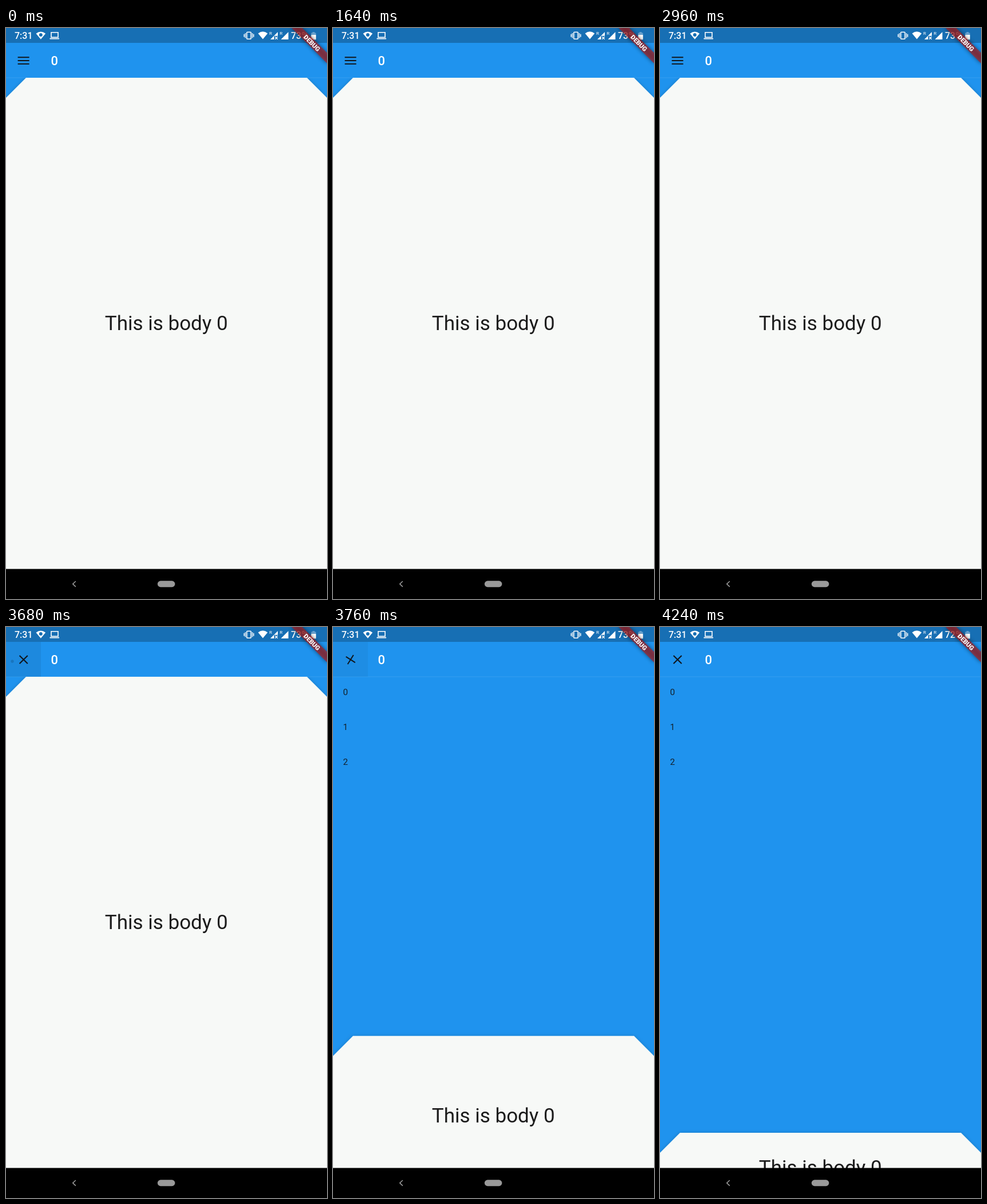
Animation of 561x998 px, one loop 5040 ms. Source, as an HTML page:

```html
<!DOCTYPE html>
<html lang="en">
<head>
<meta charset="utf-8">
<title>Backdrop</title>
<style>
  html, body { margin: 0; width: 100%; height: 100%; overflow: hidden; background: #000; }
  svg { display: block; width: 100vw; height: 100vh; }
  text { font-family: Roboto, sans-serif; }
</style>
</head>
<body>
<svg viewBox="0 0 561 998">
  <defs>
    <clipPath id="content"><rect y="87" width="561" height="859"/></clipPath>
    <filter id="soft" x="-30%" y="-150%" width="160%" height="400%"><feGaussianBlur stdDeviation="3.5"/></filter>
    <filter id="lift" filterUnits="userSpaceOnUse" x="-20" y="60" width="601" height="960">
      <feDropShadow dx="0" dy="1" stdDeviation="3" flood-color="#000" flood-opacity=".25"/>
    </filter>
    <path id="fan" d="M0 3.3Q8.3 -3.3 16.6 3.3L8.3 13.4Z"/>
  </defs>

  <rect width="561" height="946" fill="#1f93ee"/>
  <rect width="561" height="26" fill="#176fb4"/>
  <rect y="86.5" width="561" height="1" fill="#379ff1"/>

  <!-- menu behind the panel -->
  <g font-size="15.3" fill="#14222e">
    <text x="17.5" y="119">0</text>
    <text x="17.5" y="180">1</text>
    <text x="17.5" y="241.3">2</text>
  </g>

  <g clip-path="url(#content)">
    <g id="panel">
      <path d="M35 87H526L561 122V990H0V122Z" fill="#f7f9f7" filter="url(#lift)"/>
    </g>
    <text id="bodyText" x="280.3" y="528.4" font-size="35" fill="#1c1c1c" text-anchor="middle">This is body 0</text>
  </g>

  <!-- app bar -->
  <rect id="highlight" y="26" width="61" height="61" opacity="0"/>
  <circle id="ripple" cx="11" cy="60" r="2.7" opacity=".14"/>
  <g fill="none" stroke="#10161c" stroke-width="2.1">
    <path id="menuIcon" d="M20.6 51.3H40.6M20.6 57H40.6M20.6 62.7H40.6"/>
    <path id="closeIcon" d="M23.6 49.9L37.8 64.1M37.8 49.9L23.6 64.1"/>
  </g>
  <text x="78.5" y="65" font-size="21.9" font-weight="500" fill="#fff">0</text>

  <!-- status bar -->
  <g fill="#fff">
    <g font-size="16" font-weight="500">
      <text x="15" y="19">7:31</text>
      <text id="battery" x="498" y="19">73%</text>
    </g>
    <use href="#fan" x="52.5" y="6.4"/>
    <circle cx="60.8" cy="12" r="3" fill="#176fb4"/>
    <path d="M79 7.8H91V16.2H79Z" fill="none" stroke="#fff" stroke-width="1.6"/>
    <rect x="76.5" y="17.7" width="16.5" height="1.8"/>
    <rect x="420.8" y="7.2" width="7.4" height="12" rx="1" fill="none" stroke="#fff" stroke-width="1.6"/>
    <path d="M416.2 10.7V15.7M418.4 9V17.4M430.6 9V17.4M432.8 10.7V15.7" stroke="#fff" stroke-width="1.4"/>
    <use href="#fan" x="440.6" y="6.2"/>
    <path d="M475 7V20H462Z"/>
    <path d="M468.5 13.8H477V21H468.5Z" fill="#176fb4"/>
    <path d="M470.3 15.3L474.7 19.7M474.7 15.3L470.3 19.7" stroke="#fff" stroke-width="1.3"/>
    <path d="M493.5 7V20H480.5Z"/>
    <g font-size="8">
      <text x="460" y="12">R</text>
      <text x="478.3" y="12">R</text>
    </g>
    <path d="M533.3 8.5H535.5V7H539.5V8.5H541.7V20.3H533.3Z" opacity=".35"/>
    <rect x="533.3" y="12" width="8.4" height="8.3"/>
  </g>

  <!-- corner banner -->
  <g transform="translate(561 0) rotate(45)">
    <rect x="-43.7" y="30.6" width="87.4" height="13.1" opacity=".5" filter="url(#soft)"/>
    <rect x="-43.7" y="30.6" width="87.4" height="13.1" fill="#b71c1c" fill-opacity=".63"/>
    <text y="41.2" font-size="11.15" font-weight="900" fill="#fff" text-anchor="middle">DEBUG</text>
  </g>

  <!-- navigation bar -->
  <rect y="945.5" width="561" height="52.5"/>
  <path d="M121.8 967L116.8 971.8L121.8 976.6" fill="none" stroke="#a0a0a0" stroke-width="1.5"/>
  <rect x="264.8" y="966.3" width="30.6" height="10.9" rx="5.45" fill="#999"/>
</svg>
<script>
  const LOOP = 5040, STEP = 40;
  const PRESS = 3560, SWAP = 3680, OPEN = 3720, BATTERY_DROP = 4120;
  const FLING_START = 3639.7, TRAVEL = 797, OMEGA = 23.5, VELOCITY = 2;

  const el = id => document.getElementById(id);
  const [panel, bodyText, highlight, ripple, menuIcon, closeIcon, battery] =
    ['panel', 'bodyText', 'highlight', 'ripple', 'menuIcon', 'closeIcon', 'battery'].map(el);
  const clamp = v => Math.max(0, Math.min(1, v));
  const show = (node, on) => node.setAttribute('visibility', on ? 'visible' : 'hidden');
  const shift = (node, y) => node.setAttribute('transform', `translate(0 ${y.toFixed(2)})`);

  // Share of the travel left in a critically damped spring.
  function remaining(t) {
    if (t < OPEN) return 1;
    const s = (t - FLING_START) / 1000;
    return Math.exp(-OMEGA * s) * (1 + (OMEGA - VELOCITY) * s);
  }

  function render(t) {
    const left = remaining(t);
    const y = TRAVEL * (1 - left);
    shift(panel, y);
    shift(bodyText, y * 0.538);

    const fade = t <= OPEN ? clamp((t - PRESS) / 120) : clamp(1 - (t - OPEN) / 120);
    highlight.setAttribute('opacity', 0.065 * fade);
    show(ripple, t >= SWAP - STEP && t < OPEN);

    show(menuIcon, t < SWAP);
    show(closeIcon, t >= SWAP);
    const turn = t < OPEN ? 0 : -28 * Math.sqrt(left);
    const size = t < OPEN ? 1 : 1 - 0.25 * left;
    closeIcon.setAttribute('transform',
      `translate(30.7 57) rotate(${turn}) scale(${size}) translate(-30.7 -57)`);

    battery.textContent = t < BATTERY_DROP ? '73%' : '72%';
  }

  const start = performance.now();
  function tick() {
    const t = (performance.now() - start) % LOOP;
    render(Math.floor(t / STEP) * STEP);
    requestAnimationFrame(tick);
  }
  tick();
</script>
</body>
</html>
```
